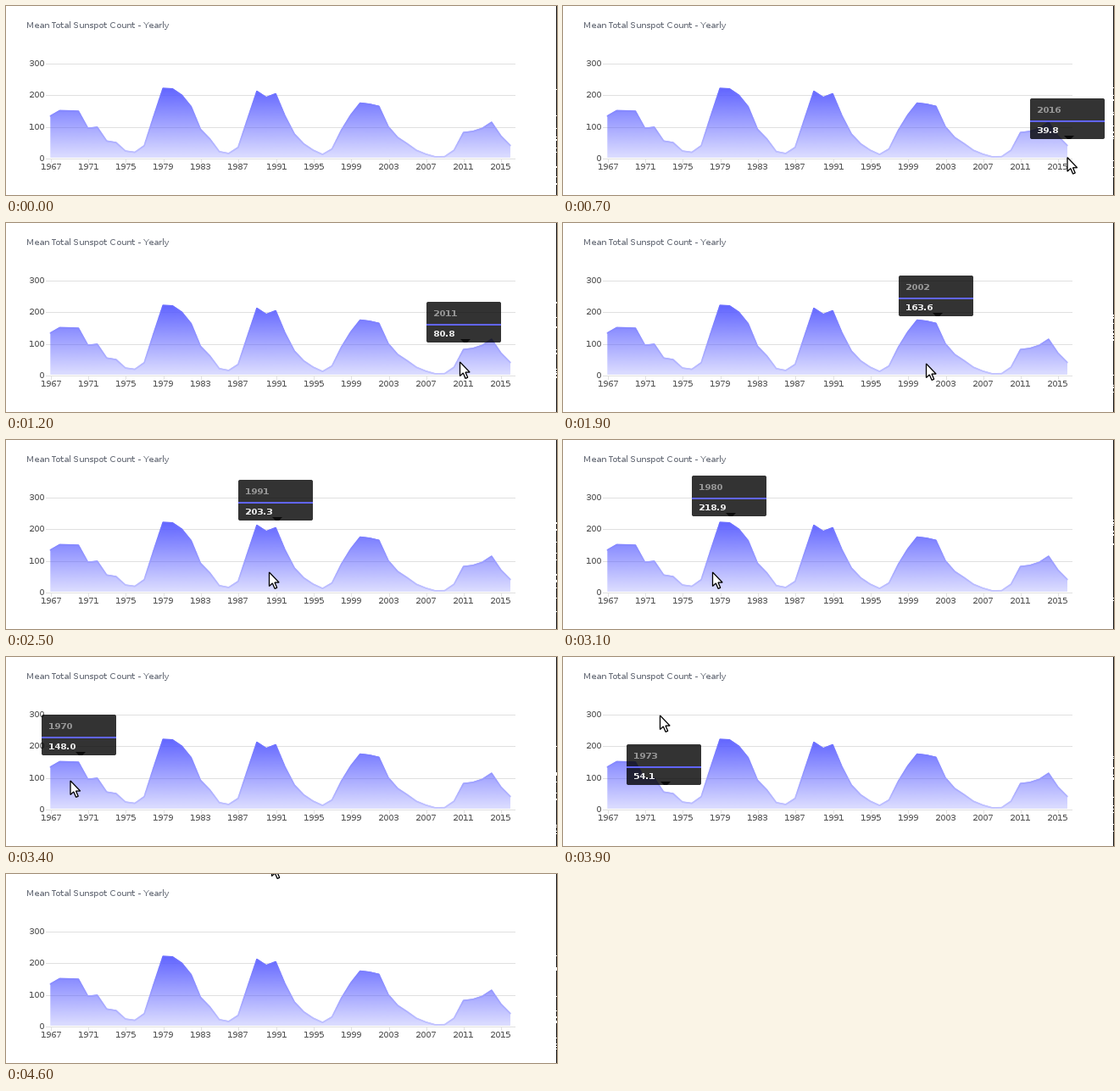
A matplotlib script that plays this animation: 650 px wide and 223 px high, repeating every 4.8 s.

```python
import random

import matplotlib.pyplot as plt
import numpy as np
from matplotlib.animation import FuncAnimation
from matplotlib.collections import LineCollection
from matplotlib.patches import FancyBboxPatch, Polygon, Rectangle

W, H, DPI = 650, 223, 100
STEP, FRAMES = 100, 48
PX = 72 / DPI
BLUE = np.array([84, 88, 255]) / 255

plt.rcParams.update({
    "font.family": "DejaVu Sans",
    "text.hinting": "native",
    "text.hinting_factor": 1,
    "toolbar": "None",
})

# Yearly mean total sunspot number, 1967-2016
SUNSPOTS = np.array([
    132.9, 150.0, 149.4, 148.0, 94.4, 97.6, 54.1, 49.2, 22.5, 18.4,
    39.3, 131.0, 220.1, 218.9, 198.9, 162.4, 91.0, 60.5, 20.6, 14.8,
    33.9, 123.0, 211.1, 191.8, 203.3, 133.0, 76.1, 44.9, 25.1, 11.6,
    28.9, 88.3, 136.3, 173.9, 170.4, 163.6, 99.3, 65.3, 45.8, 24.7,
    12.6, 4.2, 4.8, 24.9, 80.8, 84.5, 94.0, 113.3, 69.8, 39.8])
FIRST, X0, DX = 1967, 52.3, 11.075
BASE, SCALE = 179.5, 112 / 300

# Pointer path: time (ms), x, y
PATH = np.array([
    (200, 608, 230), (300, 606, 213), (500, 601, 188), (800, 592, 174),
    (900, 583, 171), (1000, 571, 168), (1100, 552, 165), (1200, 535.5, 164),
    (1300, 486, 165), (1400, 469, 166), (1600, 469, 166), (1800, 446, 166),
    (1900, 428.5, 166), (2000, 390, 162), (2100, 331, 158), (2200, 317, 157),
    (2400, 315.5, 156), (2500, 310.5, 156), (2600, 295, 156),
    (2700, 262, 156), (2800, 228, 156), (2900, 222, 156), (3000, 211, 156),
    (3100, 176.5, 156), (3200, 135, 154), (3300, 96, 151), (3400, 76, 146),
    (3500, 66, 137), (3600, 62, 124), (3700, 78, 104), (3800, 116, 85),
    (3900, 114.5, 69), (4000, 110, 54), (4100, 126, 38), (4600, 313.5, -14)])
ARROW = np.array([(0, 0), (0, 16.5), (3.8, 13), (6.6, 19.4), (9.2, 18.3),
                  (6.5, 12.1), (11.6, 12.1)])


def year_x(i):
    return X0 + DX * i


def value_y(v):
    return BASE - SCALE * v


def pointer(t):
    return tuple(np.interp(t, PATH[:, 0], PATH[:, k]) for k in (1, 2))


def label(x, y, s, color="#545454", **kw):
    return ax.text(x, y, s, color=color, size=10 * PX, va="baseline", **kw)


fig = plt.figure(figsize=(W / DPI, H / DPI), dpi=DPI, facecolor="white")
ax = fig.add_axes([0, 0, 1, 1])
ax.set(xlim=(0, W), ylim=(H, 0))
ax.axis("off")

label(24, 26, "Mean Total Sunspot Count - Yearly", "#6a6f7a")

for v in range(0, 301, 100):
    y = int(value_y(v)) + 0.5
    ax.plot([47, 600], [y, y], color="#e0e0e0", lw=PX, zorder=1)
    label(45, y + 3.5, str(v), ha="right")
for i in range(0, 50, 4):
    x = int(year_x(i)) + 0.5
    ax.plot([x, x], [180, 184], color="#e0e0e0", lw=PX, zorder=1)
    label(x, 193, str(FIRST + i), ha="center")

# Area with a vertical fade
xs, ys = year_x(np.arange(50)), value_y(SUNSPOTS)
top = ys.min()
fade = np.ones((256, 1, 4))
fade[:, 0, :3] = BLUE
fade[:, 0, 3] = np.linspace(0.93, 0.2, 256)
img = ax.imshow(fade, extent=(xs[0], xs[-1], BASE, top), aspect="auto",
                interpolation="bilinear", zorder=2)
outline = [(xs[0], BASE), *zip(xs, ys), (xs[-1], BASE)]
area = Polygon(outline, fc="none", ec="none")
ax.add_patch(area)
img.set_clip_path(area)
ax.set(xlim=(0, W), ylim=(H, 0))

fine = np.linspace(0, 49, 49 * 16 + 1)
pts = np.column_stack([year_x(fine), np.interp(fine, np.arange(50), ys)])
pairs = np.stack([pts[:-1], pts[1:]], axis=1)
depth = (pairs[:, :, 1].mean(axis=1) - top) / (BASE - top)
alpha = (0.88 - 0.54 * depth)[:, None]
ax.add_collection(LineCollection(pairs, colors=1 - alpha * (1 - BLUE),
                                 linewidths=1.6 * PX, capstyle="round",
                                 zorder=3))

# Dark border at the right with flickering gaps
ax.add_patch(Rectangle((649, 0), 1, H, fc="#111111", lw=0, zorder=4))
gaps = [ax.add_patch(Rectangle((649, 0), 1, 1, fc="white", lw=0, zorder=5))
        for _ in range(12)]

# Tooltip
TIP_W, TIP_H = 88, 48
box = ax.add_patch(FancyBboxPatch(
    (0, 0), TIP_W, TIP_H, boxstyle="round,pad=0,rounding_size=2",
    fc=(0, 0, 0, 0.8), lw=0, zorder=6))
notch = ax.add_patch(Polygon([(0, 0)] * 4, fc=(0, 0, 0, 0.8), lw=0, zorder=7))
rule = ax.add_patch(Rectangle((0, 0), TIP_W, 2, fc="#6165ff", lw=0, zorder=7))
year_text = label(0, 0, "", "#959595", weight="bold", zorder=8)
value_text = label(0, 0, "", "#ececec", weight="bold", zorder=8)
tooltip = [box, notch, rule, year_text, value_text]

cursor = ax.add_patch(Polygon(ARROW, fc="white", ec="black", lw=1.3 * PX,
                              joinstyle="miter", zorder=9))


def place_tooltip(i):
    left = round(year_x(i) - TIP_W / 2)
    up = round(value_y(SUNSPOTS[i]) - 56.12)
    mid = left + TIP_W / 2 + 2
    box.set_bounds(left, up, TIP_W, TIP_H)
    notch.set_xy([(mid - 6, up + 44), (mid + 6, up + 44),
                  (mid + 2, up + 48), (mid - 2, up + 48)])
    rule.set_xy((left, up + 26))
    year_text.set_position((left + 8, up + 17))
    year_text.set_text(str(FIRST + i))
    value_text.set_position((left + 8, up + 41))
    value_text.set_text(f"{SUNSPOTS[i]:.1f}")


def flicker(n):
    if 1 <= n <= 8:
        n = 1
    elif 14 <= n <= 16:
        n = 14
    rng = random.Random(min(n, 46))
    for g in gaps:
        g.set_y(rng.randint(93, 213))
        g.set_height(rng.choice((1, 1, 2)))


def draw(n):
    t = n * STEP
    x, y = pointer(t)
    cursor.set_xy(ARROW + (x, y))
    cursor.set_visible(t >= 300)

    # The tooltip trails the pointer by half a step
    late_x = pointer(t - STEP / 2)[0]
    shown = 48 < y < 182
    if shown:
        place_tooltip(int(np.clip(round((late_x - X0) / DX), 0, 49)))
    for part in tooltip:
        part.set_visible(shown)

    flicker(n)
    return [*tooltip, cursor, *gaps]


anim = FuncAnimation(fig, draw, frames=FRAMES, interval=STEP, repeat=True,
                     repeat_delay=0, blit=False)
plt.show()
```
